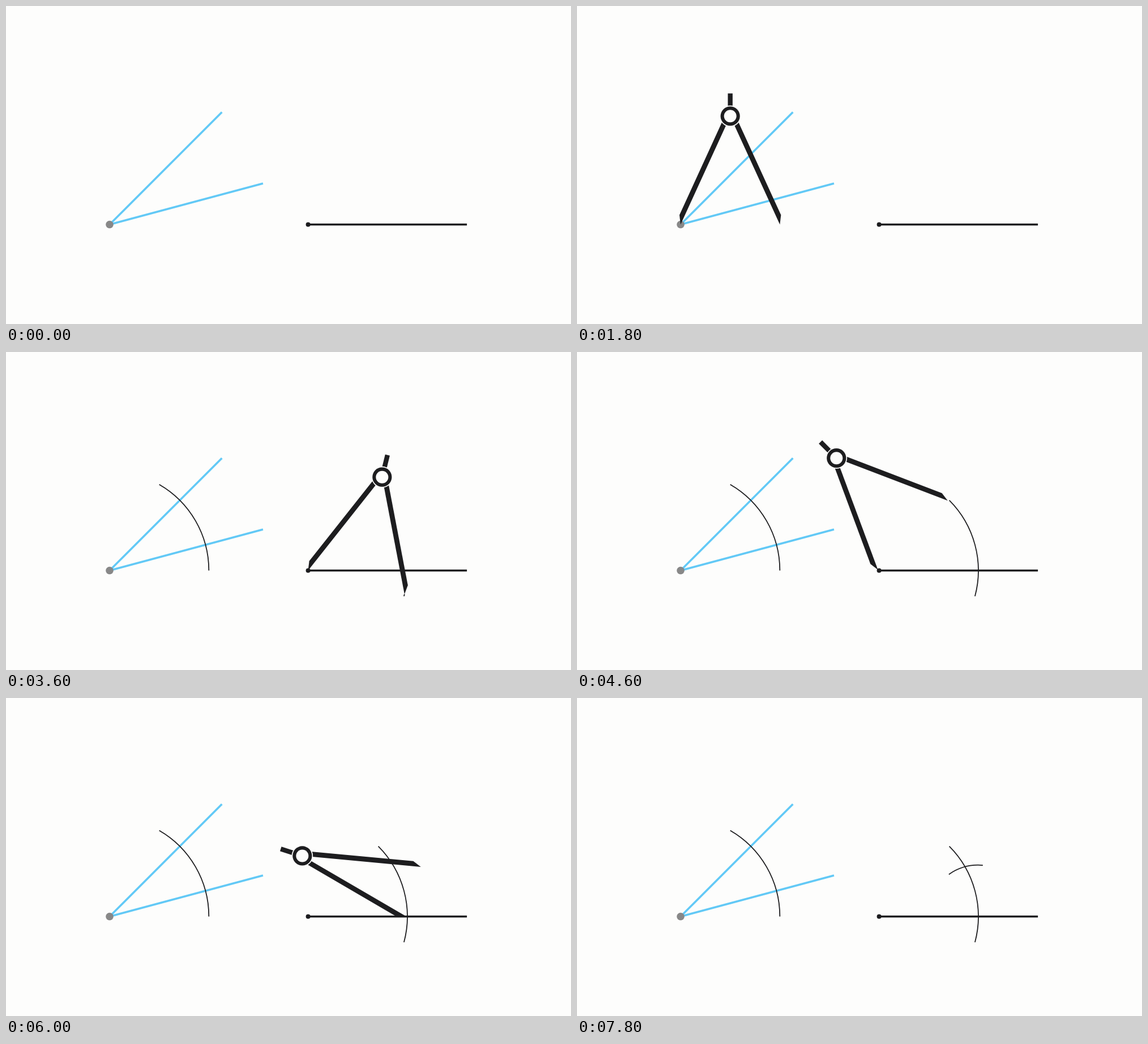
An HTML page with a canvas that plays this animation: 998x561 px, repeating every 8000 ms.

```html
<!DOCTYPE html>
<html lang="en">
<head>
<meta charset="utf-8">
<title>Copying an angle</title>
<style>
  html, body { margin: 0; width: 100%; height: 100%; overflow: hidden; background: #fdfdfc; }
  canvas { display: block; }
</style>
</head>
<body>
<canvas id="stage" width="998" height="561"></canvas>
<script>
const ctx = document.getElementById('stage').getContext('2d');
const W = 998, H = 561, LOOP = 8000, STEP = 200;
const PAPER = '#fdfdfc', INK = '#1d1d1f', BLUE = '#62c9f6', GREY = '#888888';
const UNIT = H / 8;
const RADIUS = 2.5 * UNIT, LEG = 3 * UNIT, RAY = 4 * UNIT;
const NARROW = 2 * RADIUS * Math.sin(Math.PI / 12);
const MOVE = 500;

// Start time of each action
const START = { enter: 960, arc1: 2195, toLine: 2860, arc2: 3530, measure: 4557, toMark: 5544, arc3: 6520, leave: 7455 };

const polar = (c, r, deg) => {
  const a = deg * Math.PI / 180;
  return { x: c.x + r * Math.cos(a), y: c.y - r * Math.sin(a) };
};
const mix = (a, b, k) => a + (b - a) * k;
const mixPoint = (a, b, k) => ({ x: mix(a.x, b.x, k), y: mix(a.y, b.y, k) });
const sigmoid = x => 1 / (1 + Math.exp(-x));
const smooth = k => {
  const e = sigmoid(-5);
  return Math.min(1, Math.max(0, (sigmoid(10 * (k - 0.5)) - e) / (1 - 2 * e)));
};

const A = { x: 183, y: 385.5 };
const B = { x: A.x + 5 * UNIT, y: A.y };
const HIGH = polar(A, RADIUS, 45);
const LOW = polar(A, RADIUS, 15);
const MARK = polar(B, RADIUS, 0);

function line(a, b, color, width) {
  ctx.strokeStyle = color;
  ctx.lineWidth = width;
  ctx.beginPath();
  ctx.moveTo(a.x, a.y);
  ctx.lineTo(b.x, b.y);
  ctx.stroke();
}

function disc(c, r, color) {
  ctx.fillStyle = color;
  ctx.beginPath();
  ctx.arc(c.x, c.y, r, 0, 2 * Math.PI);
  ctx.fill();
}

function arc(c, r, from, to) {
  if (to <= from) return;
  ctx.strokeStyle = INK;
  ctx.lineWidth = 1.8;
  ctx.beginPath();
  ctx.arc(c.x, c.y, r, -from * Math.PI / 180, -to * Math.PI / 180, true);
  ctx.stroke();
}

// Inner edge runs from hinge to tip, the body lies on the given side
function leg(hinge, tip, side) {
  ctx.save();
  ctx.translate(hinge.x, hinge.y);
  ctx.rotate(Math.atan2(tip.y - hinge.y, tip.x - hinge.x));
  ctx.fillStyle = INK;
  ctx.beginPath();
  ctx.moveTo(12, 0);
  ctx.lineTo(LEG, 0);
  ctx.lineTo(LEG - 14.3, side * 8.8);
  ctx.lineTo(12, side * 8.8);
  ctx.fill();
  ctx.restore();
}

function compass(needle, pen) {
  const dx = pen.x - needle.x, dy = pen.y - needle.y;
  const span = Math.hypot(dx, dy);
  const rise = Math.sqrt(LEG * LEG - span * span / 4);
  const up = { x: dy / span, y: -dx / span };
  const mid = mixPoint(needle, pen, 0.5);
  const along = d => ({ x: mid.x + up.x * d, y: mid.y + up.y * d });
  const hinge = along(rise);
  leg(hinge, needle, 1);
  leg(hinge, pen, -1);
  line(hinge, along(rise + 40), INK, 8.4);
  disc(hinge, 18.8, PAPER);
  disc(hinge, 17.1, INK);
  disc(hinge, 11, PAPER);
}

function draw(t) {
  const part = name => Math.min(1, Math.max(0, (t - START[name]) / MOVE));
  const ease = name => smooth(part(name));

  ctx.fillStyle = PAPER;
  ctx.fillRect(0, 0, W, H);
  line(A, polar(A, RAY, 45), BLUE, 3.6);
  line(A, polar(A, RAY, 15), BLUE, 3.6);
  disc(A, 6.8, GREY);
  line(B, polar(B, RAY, 0), INK, 3.5);
  disc(B, 4, INK);

  const turn1 = 60 * ease('arc1');
  const turn2 = -15 + 60 * ease('arc2');
  const turn3 = 85 + 40 * ease('arc3');
  arc(A, RADIUS, 0, turn1);
  arc(B, RADIUS, -15, turn2);
  arc(MARK, NARROW, 85, turn3);

  if (t < START.enter) return;
  let needle, pen;
  if (t < START.toLine) {
    needle = A;
    pen = polar(needle, RADIUS, turn1);
  } else if (t < START.arc2) {
    needle = mixPoint(A, B, ease('toLine'));
    pen = polar(needle, RADIUS, mix(60, -15, part('toLine')));
  } else if (t < START.measure) {
    needle = B;
    pen = polar(needle, RADIUS, turn2);
  } else if (t < START.toMark) {
    const k = ease('measure');
    needle = mixPoint(B, HIGH, k);
    pen = mixPoint(polar(B, RADIUS, 45), LOW, k);
  } else if (t < START.arc3) {
    needle = mixPoint(HIGH, MARK, ease('toMark'));
    pen = polar(needle, NARROW, mix(-60, 85, part('toMark')));
  } else {
    needle = MARK;
    pen = polar(needle, NARROW, turn3);
  }

  ctx.save();
  ctx.translate(0, H * (ease('enter') - 1 + ease('leave')));
  compass(needle, pen);
  ctx.restore();
}

function tick() {
  const t = performance.now() % LOOP;
  draw(Math.floor(t / STEP) * STEP);
  requestAnimationFrame(tick);
}
tick();
</script>
</body>
</html>
```
